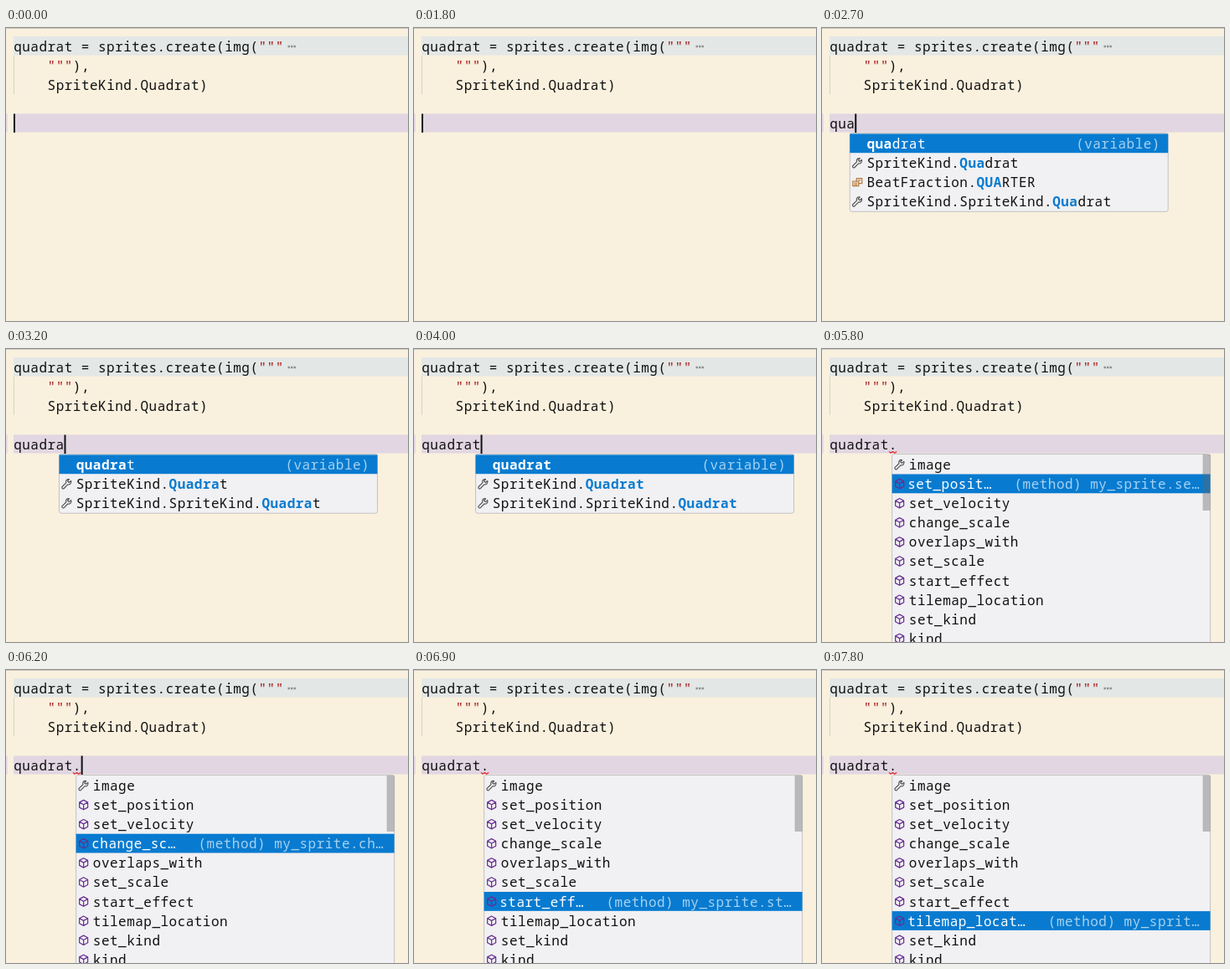
An HTML page that plays this animation: 480x350 px, repeating every 8 s.

```html
<!DOCTYPE html>
<html lang="en">
<head>
<meta charset="utf-8">
<title>Code completion</title>
<style>
  html, body { margin: 0; width: 100%; height: 100%; overflow: hidden; background: #f9f0de; }
  svg { display: block; }
  text { font: 16px "Noto Sans Mono", monospace; letter-spacing: .48px; white-space: pre; fill: #111; }
  .str { fill: #a31515; }
  .hit { font-weight: 700; fill: #087bd0; }
  .sel, .sel .hit { fill: #fff; }
  .detail { fill: #a6d1f0; }
  .icon { fill: none; stroke-width: 1.2; stroke-linejoin: round; stroke-linecap: round; }
</style>
</head>
<body>
<svg width="480" height="350" viewBox="0 0 480 350">
  <defs>
    <path id="wrench" class="icon" stroke="#555" d="M5.2-3.6 2.8-1.6 1-3.2 3-5.4C.2-6.2-1.6-3.6-.7-1.2L-5.4 3.4C-6.4 5.2-4.6 6.4-3.2 5.4L1.3.8C4 1.4 6-.8 5.2-3.6Z"/>
    <path id="cube" class="icon" stroke="#652d90" d="M0-5.7 5-3V3L0 5.7-5 3V-3ZM-5-3 0-.3 5-3M0-.3V5.7"/>
    <g id="enum" class="icon" stroke="#b5793f">
      <path d="M-1-1V-4.5H5.5V1.5H2M1.3-2.4H3.6"/>
      <path d="M-5.5-1.2H1.5V4.5H-5.5ZM-3.6 .8H-.4M-3.6 2.6H-.4"/>
    </g>
  </defs>
  <rect width="480" height="350" fill="#f9f0de"/>
  <rect width="480" height="1" fill="#cfc9bd"/>
  <rect x="9" y="10" width="471" height="22.5" fill="#e3e7e6"/>
  <rect x="9" y="102.5" width="471" height="22" fill="#e1d6e2"/>
  <rect y="102.5" width="1.6" height="22" fill="#e1d6e2"/>
  <rect x="9" y="33" width="1" height="46" fill="#d9d3c5"/>
  <text x="9.2" y="27.5">quadrat = sprites.create(img(<tspan class="str">"""</tspan></text>
  <path d="M336.5 22h9.5" stroke="#8f9493" stroke-width="2.4" stroke-dasharray="2.5 1"/>
  <text x="49.6" y="50.6"><tspan class="str">"""</tspan>),</text>
  <text x="49.6" y="73.7">SpriteKind.Quadrat)</text>
  <g id="live"></g>
</svg>
<script>
const LOOP = 8000, CHAR = 10.08, LEFT = 9, ROW = 23.1, TOP = 126.4, WIDTH = 380;
const live = document.getElementById('live');

// Each track is a list of [start time, value].
const typed = [[0, 0], [2100, 1], [2300, 2], [2500, 3], [2800, 4], [2900, 5], [3000, 6], [3700, 7], [4200, 8]];
const caret = [[0, 1], [300, 0], [800, 1], [1300, 0], [1800, 1], [3500, 0], [3700, 1],
  [4700, 0], [5200, 1], [5700, 0], [6200, 1], [6700, 0], [7200, 1], [7700, 0]];
const popup = [[0, ''], [2700, 'words'], [4200, ''], [4900, 'members']];
const picked = [[0, 0], [5800, 1], [6000, 2], [6200, 3], [6400, 4], [6700, 5], [6900, 6], [7100, 7]];
const error = [[0, 0], [5200, 1]];

// icon, unmatched prefix, matched word
const words = [
  ['', '', 'quadrat'],
  ['wrench', 'SpriteKind.', 'Quadrat'],
  ['enum', 'BeatFraction.', 'QUARTER'],
  ['wrench', 'SpriteKind.SpriteKind.', 'Quadrat']
];

// name, shortened name, detail
const members = [
  ['image', 'image', '(property) my_sprite.i…'],
  ['set_position', 'set_posit…', '(method) my_sprite.se…'],
  ['set_velocity', 'set_veloc…', '(method) my_sprite.se…'],
  ['change_scale', 'change_sc…', '(method) my_sprite.ch…'],
  ['overlaps_with', 'overlaps_…', '(method) my_sprite.ov…'],
  ['set_scale', 'set_scale', '(method) my_sprite.set…'],
  ['start_effect', 'start_eff…', '(method) my_sprite.st…'],
  ['tilemap_location', 'tilemap_locat…', '(method) my_sprit…'],
  ['set_kind'],
  ['kind']
];

const at = (track, t) => track.findLast(([start]) => start <= t)[1];
const rect = (x, y, w, h, fill, more = '') =>
  `<rect x="${x}" y="${y}" width="${w}" height="${h}" fill="${fill}" ${more}/>`;
const text = (x, y, body, cls = '') => `<text x="${x + .2}" y="${y}" class="${cls}">${body}</text>`;
const use = (id, x, y) => id ? `<use href="#${id}" x="${x}" y="${y}"/>` : '';
const rowY = i => TOP + i * ROW;
const panel = (x, rows) =>
  rect(x, TOP - .9, WIDTH, rows * ROW + 1.4, '#f1f0f2', 'rx="2.5" stroke="#c4c2c4"');
const bar = (x, i) => rect(x, rowY(i), WIDTH, ROW - .3, '#087bd0');

function wordList(x, n) {
  const rows = words.filter(([, , w]) => w.toLowerCase().startsWith('quadrat'.slice(0, n)));
  return panel(x, rows.length) + bar(x, 0) + rows.map(([icon, prefix, word], i) => {
    const label = `${prefix}<tspan class="hit">${word.slice(0, n)}</tspan>${word.slice(n)}`;
    return use(icon, x + 9, rowY(i) + 11.6) + text(x + 20, rowY(i) + 17.5, label, i ? '' : 'sel');
  }).join('') + text(x + WIDTH - 9.5 - 10 * CHAR, rowY(0) + 17.5, '(variable)', 'detail');
}

function memberList(x, sel) {
  return panel(x, 12) + bar(x, sel) + members.map(([name, short, detail], i) => {
    const y = rowY(i) + 17.5, on = i === sel, label = on ? short : name;
    const labelX = x + (label === name ? 20 : 18.4);
    const detailX = i ? labelX + label.length * CHAR + 26.5 : x + 132.4;
    return use(i ? 'cube' : 'wrench', x + 9, rowY(i) + 11.6) +
      text(labelX, y, label, on ? 'sel' : '') + (on ? text(detailX, y, detail, 'detail') : '');
  }).join('') + rect(x + WIDTH - 9, TOP - .4, 9, 67, '#646464', 'opacity=".4"');
}

let shown;
function draw() {
  const t = performance.now() % LOOP;
  const state = [typed, caret, popup, picked, error].map(track => at(track, t));
  const key = state.join();
  if (key !== shown) {
    shown = key;
    const [n, blink, list, sel, wrong] = state;
    const end = LEFT + n * CHAR, x = end - 6;
    live.innerHTML = text(LEFT, 119.7, 'quadrat.'.slice(0, n)) +
      (wrong ? '<path d="M80 122.4l2 1.8 2.4-1.8 2.4 1.8 2.4-1.8" fill="none" stroke="#e0282e" stroke-width="1.2"/>' : '') +
      (blink ? rect(end, 102.5, 2, 22.5, '#111') : '') +
      (list === 'words' ? wordList(x, n) : list === 'members' ? memberList(x, sel) : '');
  }
  requestAnimationFrame(draw);
}
draw();
</script>
</body>
</html>
```
